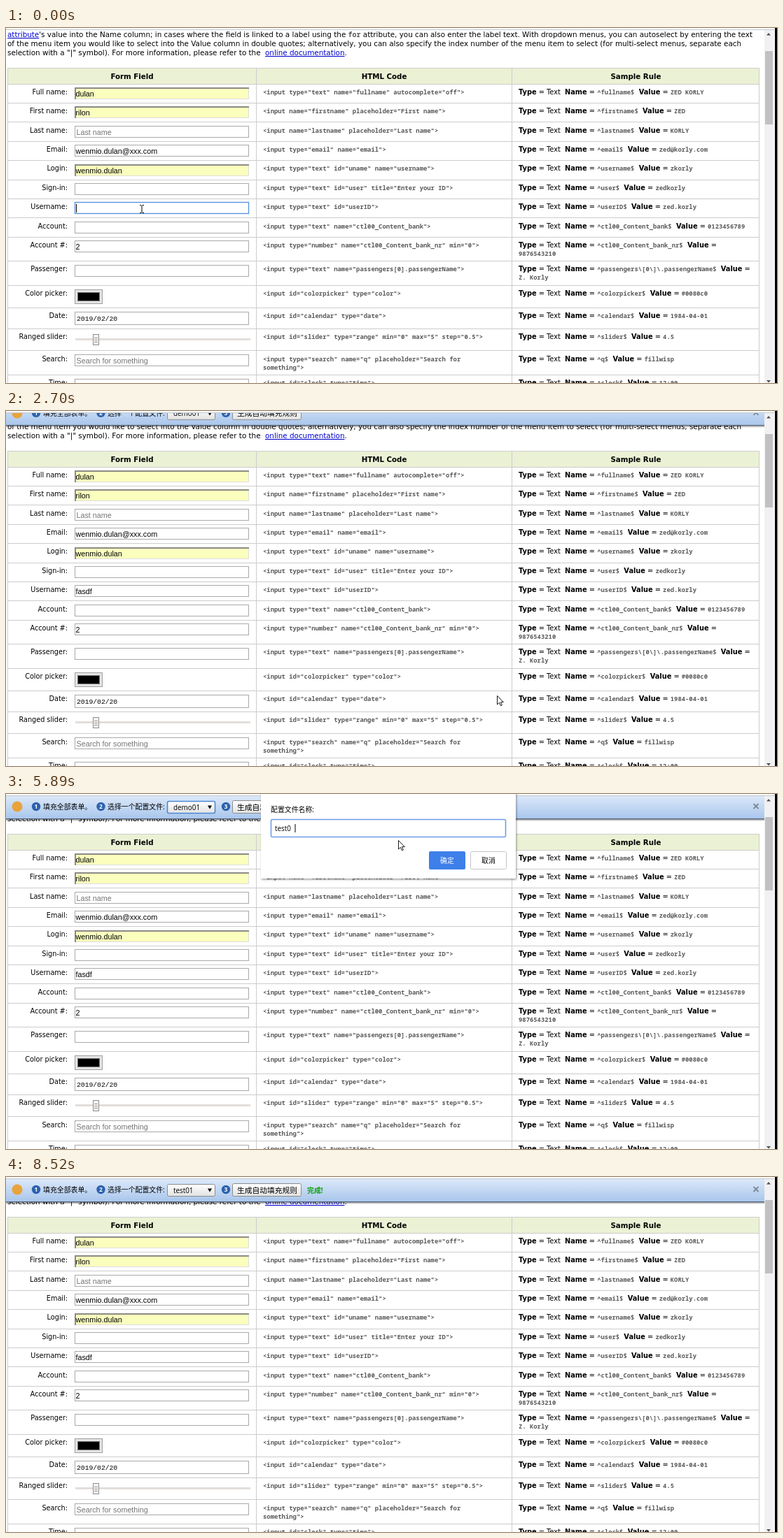
Animation of 1101 by 508 pixels, one loop 8600 ms. Source, as an HTML page:

```html
<!DOCTYPE html>
<html lang="zh-CN">
<head>
<meta charset="utf-8">
<title>Form filling rules</title>
<style>
html, body { margin: 0; width: 100%; height: 100%; overflow: hidden; background: #fff; }
svg { display: block; width: 1101px; height: 508px; }
text { white-space: pre; fill: #000; font: 9.7px "DejaVu Sans", sans-serif; }
.para { font-size: 10.38px; }
.rule { font-size: 9.8px; }
.head { font-size: 10.25px; font-weight: bold; text-anchor: middle; }
.end { text-anchor: end; }
.mid { text-anchor: middle; }
.b { font-weight: bold; }
.link { fill: #00c; text-decoration: underline; }
.code { font: 600 8.88px "Noto Sans Mono", "DejaVu Sans Mono", monospace; fill: #5a5a5a; }
.para .code { font-size: 10px; }
.field { font: 10.75px "Liberation Sans", Arial, sans-serif; }
.hint { fill: #757575; }
.date { font: 9.7px "Liberation Mono", monospace; }
.ui { font: 9.9px "Open Sans", "Noto Sans CJK SC", "Noto Sans CJK", sans-serif; }
.off { fill: #a3a39c; }
.white { fill: #fff; }
.big { font-size: 10.75px; }
.num { font-size: 8.5px; font-weight: bold; fill: #fff; text-anchor: middle; }
.done { font-weight: bold; fill: #12a012; }
</style>
</head>
<body>
<svg id="stage" viewBox="0 0 1101 508">
  <defs>
    <linearGradient id="barFill" x2="0" y2="1">
      <stop offset="0" stop-color="#dbe8f9"/><stop offset="1" stop-color="#a9c6ec"/>
    </linearGradient>
    <linearGradient id="barShade" x2="0" y2="1">
      <stop offset="0" stop-color="#000" stop-opacity=".45"/><stop offset="1" stop-color="#000" stop-opacity="0"/>
    </linearGradient>
    <linearGradient id="btnFill" x2="0" y2="1">
      <stop offset="0" stop-color="#fff"/><stop offset="1" stop-color="#e2e2e2"/>
    </linearGradient>
    <filter id="soft" x="-10%" y="-20%" width="120%" height="150%">
      <feDropShadow dx="1" dy="1.5" stdDeviation="1.4" flood-opacity=".4"/>
    </filter>
  </defs>
  <g id="page"></g>
  <g id="typing"></g>
  <g id="bar"></g>
  <g id="list"></g>
  <g id="chrome"></g>
  <g id="menu"></g>
  <g id="submenu"></g>
  <g id="dialog"></g>
  <g id="arrow"><path d="M.5.5V13L3.4 10.3 5.4 14.8 7.3 14 5.4 9.6H9.3Z" fill="#fff" stroke="#000" stroke-width=".9"/></g>
  <path id="beam" d="M-3-5.5H-1L0-4.5 1-5.5H3M0-4.5V4.5M-3 5.5H-1L0 4.5 1 5.5H3" fill="none" stroke="#000"/>
</svg>
<script>
const $ = id => document.getElementById(id);
const esc = s => s.replace(/&/g, '&amp;').replace(/</g, '&lt;');
const raw = (x, y, inner, cls = '') => `<text x="${x}" y="${y}" class="${cls}">${inner}</text>`;
const text = (x, y, s, cls) => raw(x, y, esc(s), cls);
const span = (s, cls) => `<tspan class="${cls}">${esc(s)}</tspan>`;
const rect = (x, y, w, h, fill, more = '') =>
  `<rect x="${x}" y="${y}" width="${w}" height="${h}" fill="${fill}" ${more}/>`;
const frame = (x, y, w, h, fill, line, more = '') =>
  rect(x + .5, y + .5, w - 1, h - 1, fill, `stroke="${line}" ${more}`);
const dot = (x, y, r, fill) => `<circle cx="${x}" cy="${y}" r="${r}" fill="${fill}"/>`;
const show = (id, on) => $(id).setAttribute('display', on ? 'inline' : 'none');
const shift = (id, x, y) => $(id).setAttribute('transform', `translate(${x} ${y})`);

// text centre, input top, label, code, rule name, rule value, input text, kind
const rows = [
  [92, 85, 'Full name', 'type="text" name="fullname" autocomplete="off"', 'fullname', 'ZED KORLY', 'dulan', 'auto'],
  [119, 112, 'First name', 'name="firstname" placeholder="First name"', 'firstname', 'ZED', 'rilon', 'auto'],
  [147, 140, 'Last name', 'name="lastname" placeholder="Last name"', 'lastname', 'KORLY', 'Last name', 'hint'],
  [174, 167, 'Email', 'type="email" name="email"', 'email', 'zed@korly.com', 'wenmio.dulan@xxx.com'],
  [201, 195, 'Login', 'type="text" id="uname" name="username"', 'username', 'zkorly', 'wenmio.dulan', 'auto'],
  [229, 222, 'Sign-in', 'type="text" id="user" title="Enter your ID"', 'user', 'zedkorly', ''],
  [256, 249, 'Username', 'type="text" id="userID"', 'userID', 'zed.korly', ''],
  [284, 277, 'Account', 'type="text" name="ctl00_Content_bank"', 'ctl00_Content_bank', '0123456789', ''],
  [311, 304, 'Account #', 'type="number" name="ctl00_Content_bank_nr" min="0"', 'ctl00_Content_bank_nr', '\n9876543210', '2'],
  [345, 339, 'Passenger', 'type="text" name="passengers[0].passengerName"', 'passengers\\[0\\]\\.passengerName', '\nZ. Korly', ''],
  [380, 374, 'Color picker', 'id="colorpicker" type="color"', 'colorpicker', '#0080c0', '', 'color'],
  [412, 406, 'Date', 'id="calendar" type="date"', 'calendar', '1984-04-01', '2019/02/20', 'date'],
  [442, 437, 'Ranged slider', 'id="slider" type="range" min="0" max="5" step="0.5"', 'slider', '4.5', '', 'range'],
  [473.5, 467, 'Search', 'type="search" name="q" placeholder="Search for\nsomething"', 'q', 'fillwisp', 'Search for something', 'hint'],
  [507.5, 502, 'Time', 'id="clock" type="time"', 'clock', '12:00', '']
];

function inputBox(top, value, kind) {
  if (kind === 'color')
    return frame(98, top, 40, 21, '#e4e4e4', '#a0a0a0') + frame(102, top + 4, 32, 13, '#000', '#777');
  if (kind === 'range')
    return rect(99, 444, 250, 3, '#e3dedb') + frame(124, 438, 9, 16, '#f2f2f2', '#8f8f8f') +
      [443, 446, 449].map(y => rect(126, y, 5, 1, '#999')).join('');
  const h = kind === 'date' ? 19 : 17;
  if (kind === 'auto')
    return rect(98, top, 249, h, '#dedede') + rect(98, top, 249, 2, '#8b8b85') + rect(98, top, 2, h, '#8b8b85') +
      rect(100, top + 2, 246, h - 3, '#faffbd') + text(99.5, top + 12.7, value, 'field');
  const hint = kind === 'hint';
  return frame(98, top, 249, h, '#fff', '#a9a9a9') +
    text(hint ? 100.5 : kind ? 101 : 99.5, top + (kind === 'date' ? 13.3 : 12.7), value,
      kind === 'date' ? 'date' : hint ? 'field hint' : 'field');
}

function drawRow([y, top, label, code, name, value, input, kind]) {
  const base = y + 3.3;
  const [first, wrapped] = value.split('\n');
  const rule = span('Type', 'b') + ' = Text  ' + span('Name', 'b') + ' = ' + span(`^${name}$`, 'code') +
    '  ' + span('Value', 'b') + ' = ' + span(first, 'code');
  return text(88, base, label + ':', 'end') + inputBox(top, input, kind) +
    `<g>${('<input ' + code + '>').split('\n').map((s, i) => text(367, base + i * 12, s, 'code')).join('')}</g>` +
    raw(732, base, rule, 'rule') + (wrapped ? text(732, base + 12, wrapped, 'code') : '');
}

function drawPage() {
  const lines = [57, 80, 107, 134, 162, 189, 217, 244, 271, 299, 333, 368, 400, 430, 461, 496];
  $('page').innerHTML = rect(0, 0, 1101, 508, '#fff') +
    raw(2, 13, span('attribute', 'link') + "'s value into the Name column; in cases where the field is linked to a label using the " +
      span('for', 'code') + ' attribute, you can also enter the label text. With dropdown menus, you can autoselect by entering the text', 'para') +
    text(2, 26, 'of the menu item you would like to select into the Value column in double quotes; alternatively, you can also specify the index number of the menu item to select (for multi-select menus, separate each', 'para') +
    text(2, 39, 'selection with a "|" symbol). For more information, please refer to the', 'para') +
    raw(370, 39, span('online documentation', 'link') + '.', 'para') +
    rect(2, 57, 1074, 23, '#ebf1d4') +
    lines.map(y => rect(2, y, 1074, 1, '#ccc')).join('') +
    [2, 357, 722, 1075].map(x => rect(x, 57, 1, 451, '#ccc')).join('') +
    text(180, 72.6, 'Form Field', 'head') + text(540, 72.6, 'HTML Code', 'head') + text(899.5, 72.6, 'Sample Rule', 'head') +
    rows.map(drawRow).join('');
}

function drawChrome() {
  $('chrome').innerHTML = rect(0, 0, 1101, 2, '#fafafa') + rect(0, 2, 1097, 1, '#c4c8cc') +
    rect(1083, 3, 14, 505, '#f1f1f1') + rect(1084, 33, 11, 105, '#c1c1c1') +
    '<path d="M1086 10.5l3-3.5 3 3.5zM1086 504l3 3.5 3-3.5z" fill="#505050"/>' +
    rect(1098, 0, 3, 508, '#000');
}

function drawBar() {
  const step = (x, n) => dot(x, 18, 6.2, '#2c62ad') + text(x, 21, n, 'ui num');
  $('bar').innerHTML = rect(0, 3, 1083, 32, 'url(#barFill)') + rect(0, 35, 1083, 1, '#4c6178') +
    rect(0, 36, 1083, 3, 'url(#barShade)') +
    dot(16, 18, 7.5, '#e8a33a') +
    step(43, '1') + text(53, 22.3, '填充全部表单。', 'ui') +
    step(135.5, '2') + text(145, 22.3, '选择一个配置文件:', 'ui') +
    '<g id="select"></g>' +
    step(314, '3') + frame(323, 9, 99, 19, 'url(#btnFill)', '#8c8c8c', 'rx="2"') +
    text(330, 22.5, '生成自动填充规则', 'ui big') +
    '<g id="done">' + text(430, 22.5, '完成!', 'ui done') + '</g>' +
    '<path d="M1067.5 14l7 7m0-7l-7 7" stroke="#7d8896" stroke-width="1.8"/>';
}

const menuItems = [
  [224, '返回(B)', 'Alt+向左箭头', 'off'], [242, '前进(F)', 'Alt+向右箭头', 'off'], [260.5, '重新加载(R)', 'Ctrl+R'],
  [288, '另存为(A)...', 'Ctrl+S'], [306.5, '打印(P)...', 'Ctrl+P'], [325, '投射(C)...', ''], [343.5, '翻成中文（简体）(T)', ''],
  [370, '保存网页', ''], [389, 'Fillwisp', '▸'], [407.5, 'JSONView', '▸'], [426, 'Kepona', '▸'], [444.5, 'Selector actions', '▸'],
  [472, '查看网页源代码(V)', 'Ctrl+U'], [491, '检查(N)', 'Ctrl+Shift+I']
];
const icons = ['#2f86e4', '#eda13a', '#8aa3bd', '#1f55a5', '#4a7ba3'];

function drawMenu() {
  $('menu').innerHTML = frame(423, 210, 209, 292, '#fff', '#b5b5b5', 'filter="url(#soft)"') +
    '<rect id="hover" x="424" width="207" height="18.5" fill="#e9e9e9"/>' +
    [274, 356, 458].map(y => rect(425, y, 205, 1, '#e6e6e6')).join('') +
    menuItems.map(([y, label, key, cls = '']) => text(449, y + 3.6, label, 'ui ' + cls) +
      (key === '▸' ? `<path d="M621.5 ${y - 3}l3.5 3-3.5 3z"/>` : text(612, y + 3.6, key, 'ui end ' + cls))).join('') +
    icons.map((c, i) => dot(436, 370.3 + i * 18.6, 5.8, c)).join('');
  $('submenu').innerHTML = frame(631, 380, 129, 66, '#fff', '#b5b5b5', 'filter="url(#soft)"') +
    '<rect id="subHover" x="632" width="127" height="18.5" fill="#e9e9e9"/>' +
    ['填充表单', '保存表单规则', '选项'].map((s, i) => text(657, 398 + i * 18.6, s, 'ui')).join('');
}

function drawDialog() {
  $('dialog').innerHTML = rect(364, -30, 364, 151, '#fff', 'filter="url(#soft)"') +
    text(378, 25.5, '配置文件名称:', 'ui') +
    frame(378, 36, 336, 26, '#fff', '#6f9de8', 'rx="2" stroke-width="1.6"') +
    '<g id="answer"></g>' +
    rect(604, 82, 52, 26, '#3f7fea', 'rx="2"') + text(630, 98.7, '确定', 'ui mid b white') +
    frame(663, 82, 52, 26, '#fff', '#c4c4c4', 'rx="2"') + text(689, 98.7, '取消', 'ui mid');
}

// pointer path: time, x, y
const path = [
  [0, 194, 259], [470, 194, 259], [700, 424, 211], [775, 424, 211], [1010, 560, 370], [1160, 593, 372], [1400, 610, 388],
  [1550, 616, 391], [1700, 680, 394], [1840, 701, 407], [2760, 701, 407], [3480, 278, 29], [3820, 278, 29],
  [4260, 263, 59.5], [4900, 263, 59.5], [5180, 470, 114], [5420, 560, 66], [6330, 560, 66], [6650, 629, 104],
  [7230, 629, 104], [7600, 380, 18], [7780, 380, 18], [8130, 683, 158], [8450, 937, 438], [8600, 937, 438]
];
const clamp = v => Math.max(0, Math.min(1, v));
const ramp = (t, start, length) => clamp((t - start) / length);

function pointer(t) {
  const i = Math.max(1, path.findIndex(p => p[0] >= t));
  const [a, b] = [path[i - 1], path[i]];
  const k = ramp(t, a[0], b[0] - a[0]), e = k * k * (3 - 2 * k);
  return [a[1] + (b[1] - a[1]) * e, a[2] + (b[2] - a[2]) * e];
}

function userField(t) {
  const typed = 'fasdf'.slice(0, Math.max(0, Math.floor((t - 80) / 75)));
  const focus = t < 700;
  $('typing').innerHTML = frame(98, 249, 249, 17, '#fff', focus ? '#5b94e0' : '#a9a9a9', focus ? 'stroke-width="1.4"' : '') +
    text(99.5, 261.7, typed, 'field') + (focus ? rect(100 + typed.length * 5.2, 252, 1, 12, '#000') : '');
}

function select(t) {
  const focus = t > 3700 && t < 7600;
  $('select').innerHTML = frame(230, 10, 69, 18, 'url(#btnFill)', focus ? '#4d86d6' : '#8c8c8c', `rx="2" stroke-width="${focus ? 1.6 : 1}"`) +
    text(239, 22.5, t < 6800 ? 'demo01' : 'test01', 'ui') + '<path d="M288 16.5h6l-3 5z"/>';
}

function list(t, y) {
  show('list', t > 3800 && t < 4530);
  const row = y > 46 ? 1 : 0;
  $('list').innerHTML = frame(230, 28, 69, 38, '#fff', '#8c8c8c') + rect(231, 29 + row * 18, 67, 18, '#1e90ff') +
    ['demo01', '新建配置'].map((s, i) => text(236, 41.5 + i * 18, s, 'ui' + (i === row ? ' white' : ''))).join('');
}

function dialog(t) {
  const open = t < 6000 ? ramp(t, 4510, 270) : 1 - ramp(t, 6770, 230);
  const typed = 'test01'.slice(0, Math.max(0, Math.floor((t - 5330) / 100)));
  show('dialog', open > 0);
  $('dialog').setAttribute('opacity', Math.min(1, open * 1.25));
  shift('dialog', 0, (open - 1) * 17);
  $('answer').innerHTML = text(384, 52.6, typed, 'ui') + rect(384.5 + typed.length * 5.6, 43, 1, 12, '#000');
}

function draw(t) {
  const [x, y] = pointer(t);
  const beam = t < 600;
  show('beam', beam);
  show('arrow', !beam && t < 8500);
  shift(beam ? 'beam' : 'arrow', x, y);
  userField(t);

  show('menu', t > 740 && t < 1900);
  show('submenu', t > 1450 && t < 1900);
  show('hover', y > 361);
  $('hover').setAttribute('y', y < 380 ? 361 : 379.7);
  show('subHover', x > 632);
  $('subHover').setAttribute('y', y < 403 ? 384 : 403.5);

  const slide = ramp(t, 2580, 243);
  show('bar', slide > 0);
  shift('bar', 0, (slide - 1) * 33);
  show('done', t > 7700);
  select(t);
  list(t, y);
  dialog(t);
}

drawPage();
drawChrome();
drawBar();
drawMenu();
drawDialog();

const LOOP = 8600, STEP = 77.48;
let last = -1;
function tick() {
  const n = Math.floor(performance.now() % LOOP / STEP + .25);
  if (n !== last) draw((last = n) * STEP);
  requestAnimationFrame(tick);
}
tick();
</script>
</body>
</html>
```
